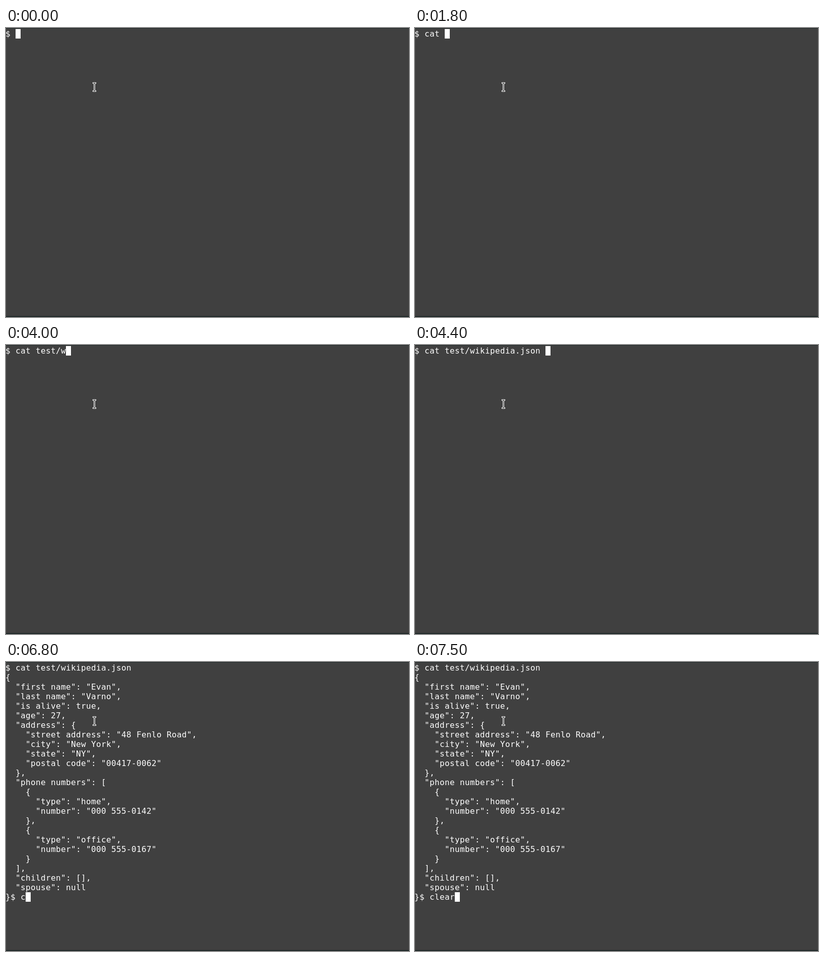
Recreate the animation shown at these times as an HTML page. Size 800 by 575 pixels, loop 8000 ms.

```html
<!DOCTYPE html>
<html lang="en">
<meta charset="utf-8">
<title>Terminal</title>
<style>
  html, body { margin: 0; width: 100%; height: 100%; overflow: hidden; background: #404040; }
  #stage { position: relative; width: 800px; height: 575px; overflow: hidden; box-sizing: border-box;
    border: solid #1f2929; border-width: 1px 0 2px; }
  pre { position: absolute; left: -1px; top: 1px; margin: 0; color: #fff;
    font: 16px/19px "DejaVu Sans Mono", monospace; letter-spacing: calc(10px - 1ch); }
  #caret { position: absolute; left: -1px; top: 1px; width: 10px; height: 19px; background: #fff; }
  svg { position: absolute; left: 172px; top: 107px; }
</style>
<div id="stage">
  <pre id="text"></pre>
  <div id="caret"></div>
  <svg width="7" height="19" shape-rendering="crispEdges">
    <path d="M0 0h7v3h-2v13h2v3h-7v-3h2v-13h-2z" fill="#fff"/>
    <path d="M1 1h5v1h-2v15h2v1h-5v-1h2v-15h-2z" fill="#222"/>
  </svg>
</div>
<script>
const LOOP = 8000, COLUMN = 10, ROW = 19;

const output = `
{
  "first name": "Evan",
  "last name": "Varno",
  "is alive": true,
  "age": 27,
  "address": {
    "street address": "48 Fenlo Road",
    "city": "New York",
    "state": "NY",
    "postal code": "00417-0062"
  },
  "phone numbers": [
    {
      "type": "home",
      "number": "000 555-0142"
    },
    {
      "type": "office",
      "number": "000 555-0167"
    }
  ],
  "children": [],
  "spouse": null
}$ `;

// Each entry adds its text at the given time in ms.
const typing = [
  [0, "$ "], [800, "c"], [1100, "a"], [1500, "t"], [1800, " "],
  [2900, "t"], [3100, "e"], [3300, "st/"], [4000, "w"], [4200, "i"], [4400, "kipedia.json "],
  [5400, output],
  [6800, "c"], [6900, "l"], [7100, "e"], [7300, "a"], [7500, "r"],
];

const text = document.getElementById("text");
const caret = document.getElementById("caret");

function draw(now) {
  const time = now % LOOP;
  const content = typing.filter(([start]) => start <= time).map(([, added]) => added).join("");
  if (content !== text.textContent) {
    const lines = content.split("\n");
    text.textContent = content;
    caret.style.transform =
      `translate(${lines.at(-1).length * COLUMN}px, ${(lines.length - 1) * ROW}px)`;
  }
  requestAnimationFrame(draw);
}

draw(0);
</script>
</html>
```
